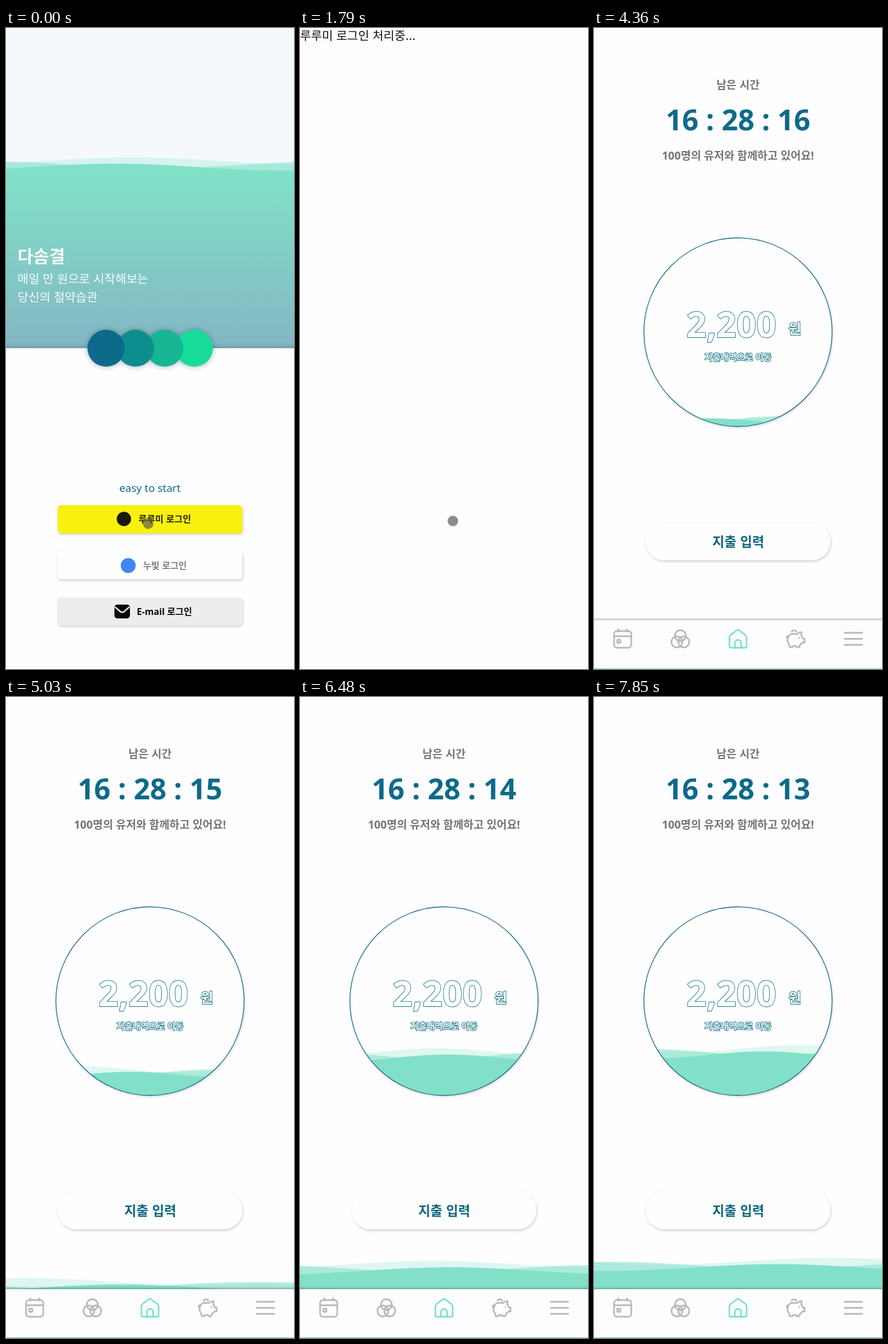
Recreate the animation shown at these times as an HTML page. Size 502 by 1115 pixels, loop 7880 ms.

```html
<!DOCTYPE html>
<html lang="ko">
<head>
<meta charset="utf-8">
<title>Login to home</title>
<style>
html, body { margin: 0; width: 100%; height: 100%; overflow: hidden; background: #fefdff; }
svg { display: block; width: 100%; height: 100%; }
text { font-family: "Noto Sans CJK KR", "Noto Sans CJK", sans-serif; }
.latin { font-family: "Noto Sans", "Noto Sans CJK KR", sans-serif; }
.bold { font-weight: 700; }
.mid { text-anchor: middle; }
.line { fill: #fefeff; stroke: #0e7182; stroke-width: 1.8; paint-order: stroke; stroke-linejoin: round; }
.icon { fill: none; stroke: #b9b9bc; stroke-width: 2.8; stroke-linecap: round; stroke-linejoin: round; }
</style>
</head>
<body>
<svg viewBox="0 0 502 1115" preserveAspectRatio="none">
  <defs>
    <linearGradient id="sea" gradientUnits="userSpaceOnUse" x1="0" y1="237" x2="0" y2="557">
      <stop offset="0" stop-color="#80e2c7"/>
      <stop offset="0.2" stop-color="#81dbc7"/>
      <stop offset="1" stop-color="#83b6c4"/>
    </linearGradient>
    <filter id="lift" x="-20%" y="-30%" width="140%" height="170%">
      <feDropShadow dx="1" dy="2" stdDeviation="2" flood-opacity="0.2"/>
    </filter>
    <filter id="edge" x="-10%" y="-30%" width="120%" height="160%">
      <feDropShadow dx="0" dy="0" stdDeviation="5" flood-color="#26404c" flood-opacity="0.45"/>
    </filter>
    <filter id="bar" x="-10%" y="-30%" width="120%" height="160%">
      <feDropShadow dx="0" dy="-1" stdDeviation="2" flood-opacity="0.4"/>
    </filter>
    <clipPath id="bowl"><circle cx="251" cy="529" r="164"/></clipPath>
  </defs>
  <rect width="502" height="1115" fill="#fefdff"/>

  <g id="login">
    <rect width="502" height="560" fill="#f5f9fc"/>
    <g id="loginSea" fill="url(#sea)"></g>
    <rect x="-30" y="557" width="562" height="600" fill="#fefdff" filter="url(#edge)"/>
    <g filter="url(#edge)">
      <ellipse cx="328" cy="557" rx="32.5" ry="32" fill="#14db9b"/>
      <ellipse cx="276.5" cy="557" rx="32.5" ry="32" fill="#12b594"/>
      <ellipse cx="225.5" cy="557" rx="32.5" ry="32" fill="#0f8e8e"/>
      <ellipse cx="174.5" cy="557" rx="32.5" ry="32" fill="#0d6b8b"/>
    </g>
    <g fill="#f6fbfc">
      <text class="bold" x="20" y="408" font-size="30">다솜결</text>
      <text x="20" y="444" font-size="20.8">매일 만 원으로 시작해보는</text>
      <text x="20" y="476" font-size="20.8">당신의 절약습관</text>
    </g>
    <text class="latin mid" x="251" y="807" font-size="18.5" fill="#0e6a87">easy to start</text>
    <g filter="url(#lift)">
      <rect x="90" y="830" width="322" height="49" rx="6" fill="#f8f10c"/>
      <rect x="90" y="910" width="322" height="49" rx="6" fill="#fefeff"/>
      <rect x="90" y="991" width="322" height="48" rx="6" fill="#edecee"/>
    </g>
    <circle cx="205.5" cy="854" r="12.5" fill="#19180a"/>
    <circle cx="213" cy="935" r="13" fill="#4285f4"/>
    <rect x="189" y="1003" width="27" height="24" rx="5" fill="#050505"/>
    <path d="M190 1007L199 1015Q202.5 1018 206 1015L215 1007" fill="none" stroke="#edecee" stroke-width="2.4"/>
    <text class="bold" x="231" y="860" font-size="15.8" fill="#24230a">루루미 로그인</text>
    <text class="bold" x="239" y="940.5" font-size="15.6" fill="#7d7d7f">누빛 로그인</text>
    <text class="latin bold" x="228" y="1021" font-size="15.8" fill="#0a0a0a">E-mail 로그인</text>
  </g>

  <text id="wait" x="0" y="21" font-size="20.8" fill="#111">루루미 로그인 처리중...</text>
  <circle id="touch" r="9.2" fill="#505050" fill-opacity="0.64"/>

  <g id="home">
    <g class="mid bold" fill="#757577">
      <text x="251" y="105.5" font-size="19">남은 시간</text>
      <text class="latin" x="251" y="229" font-size="19.2">100명의 유저와 함께하고 있어요!</text>
    </g>
    <text id="clock" class="latin mid bold" x="251" y="178" font-size="50" fill="#0c6a8a"></text>
    <circle cx="251" cy="529" r="164" fill="#fefeff" filter="url(#lift)"/>
    <g clip-path="url(#bowl)"><g id="bowlSea" fill="#82e0c8"></g></g>
    <circle cx="251" cy="529" r="164" fill="none" stroke="#0f6a85" stroke-width="1.3"/>
    <g class="bold">
      <text class="latin line" x="161" y="538" font-size="61">2,200</text>
      <text class="line" x="339" y="532" font-size="24">원</text>
      <text class="line mid" x="251" y="578" font-size="15.3">지출내역으로 이동</text>
    </g>
    <g id="floorSea" fill="#82e0c8"></g>
    <rect x="90" y="860" width="322" height="66" rx="33" fill="#fefeff" filter="url(#lift)"/>
    <text class="mid bold" x="251.5" y="901.5" font-size="22.8" fill="#0c6580">지출 입력</text>
    <rect x="-20" y="1030" width="542" height="84" fill="#fdfcfe" filter="url(#bar)"/>
    <g class="icon">
      <rect x="35" y="1049" width="30" height="29" rx="5"/>
      <path d="M35 1058H65M42.5 1046V1050M57.5 1046V1050"/>
      <rect x="40.5" y="1064" width="5.5" height="5.5" rx="1"/>
      <circle cx="150.5" cy="1057" r="9.5"/>
      <circle cx="144.5" cy="1068" r="9.5"/>
      <circle cx="156.5" cy="1068" r="9.5"/>
      <path stroke="#7fe2c8" d="M236 1075V1060Q236 1058 238 1056L248.5 1048Q251 1046 253.5 1048L264 1056Q266 1058 266 1060V1075Q266 1078 263 1078H239Q236 1078 236 1075ZM245.5 1078V1070A5.5 5.5 0 0 1 256.5 1070V1078"/>
      <path d="M344 1054H354Q358 1050 362 1051L361 1056Q363 1058 364 1062H367V1069H363Q361 1072 359 1073L358 1077H353L352 1075H347L346 1077H341L340 1072Q336 1067 338 1061Q340 1055 344 1054ZM337 1062Q335 1060 337 1058M344.5 1050A4.5 4.5 0 0 1 352.5 1050M358 1061V1061.2"/>
      <path d="M437 1052H467.5M437 1062.5H467.5M437 1073H467.5"/>
    </g>
  </g>
  <text id="size" class="latin" x="497" y="17" font-size="12.4" text-anchor="end" fill="#59595c">412px × 915px</text>
</svg>
<script>
const LOOP = 7880, WAIT = 1790, BLANK = 2200, SIZE = 2480, HOME = 3000, RISE = 3800;
const TICKS = [4060, 4990, 5990, 6990];
const PERIOD = 589;
const $ = id => document.getElementById(id);
const show = (id, on) => $(id).setAttribute('display', on ? 'inline' : 'none');

// Layers from back to front: crest positions at login start and at 5030 ms.
const layers = [
  { lift: -7, alpha: 0.26, time: 4400, login: 220, home: 35 },
  { lift: 0, alpha: 0.55, time: 8400, login: -30, home: 420 },
  { lift: 4, alpha: 1, time: 14000, login: 190, home: 200 }
];

function makeSea(id, key, left, width, bottom) {
  const paths = layers.map(l => {
    const p = document.createElementNS('http://www.w3.org/2000/svg', 'path');
    p.setAttribute('opacity', l.alpha);
    $(id).append(p);
    return p;
  });
  return (time, level) => layers.forEach((l, i) => {
    const crest = l[key] + PERIOD * time / l.time;
    let d = `M${left} ${bottom}`;
    for (let x = 0; x <= 504; x += 8) {
      const y = level + l.lift - 6 * Math.cos((x - crest) * 2 * Math.PI / PERIOD);
      d += `L${(left + x * width / 502).toFixed(1)} ${y.toFixed(2)}`;
    }
    paths[i].setAttribute('d', `${d}V${bottom}Z`);
  });
}

const loginSea = makeSea('loginSea', 'login', 0, 502, 560);
const bowlSea = makeSea('bowlSea', 'home', 87, 328, 700);
const floorSea = makeSea('floorSea', 'home', 0, 502, 1115);

const clamp = v => Math.max(0, Math.min(1, v));

// cubic-bezier(.25, .1, .25, 1)
function ease(x) {
  let lo = 0, hi = 1;
  const bez = (u, a, b) => 3 * u * (1 - u) * (1 - u) * a + 3 * u * u * (1 - u) * b + u * u * u;
  for (let i = 0; i < 24; i++) {
    const u = (lo + hi) / 2;
    if (bez(u, 0.25, 0.25) < x) lo = u; else hi = u;
  }
  return bez(lo, 0.1, 1);
}

function draw(t) {
  const login = t < WAIT, home = t >= HOME, rising = t >= RISE;
  show('login', login);
  show('wait', t >= WAIT && t < BLANK);
  show('touch', t < BLANK);
  show('home', home);
  show('size', t >= SIZE && t < TICKS[0]);
  show('bowlSea', rising);
  show('floorSea', rising);

  if (login) loginSea(Math.min(t, 1580), 238);

  const m = clamp((t - 60) / 1500), k = m * m * (3 - 2 * m);
  $('touch').setAttribute('cx', 248 + 18.5 * k);
  $('touch').setAttribute('cy', 862 - 4.5 * k);

  $('clock').textContent = `16 : 28 : ${17 - TICKS.filter(s => t >= s).length}`;
  if (rising) {
    const drop = 75 * (1 - ease(clamp((t - RISE) / 4000)));
    bowlSea(t - 5030, 618.5 + drop);
    floorSea(t - 5030, 988.5 + drop);
  }
}

const start = performance.now();
function tick() {
  draw((performance.now() - start) % LOOP);
  requestAnimationFrame(tick);
}
tick();
</script>
</body>
</html>
```
